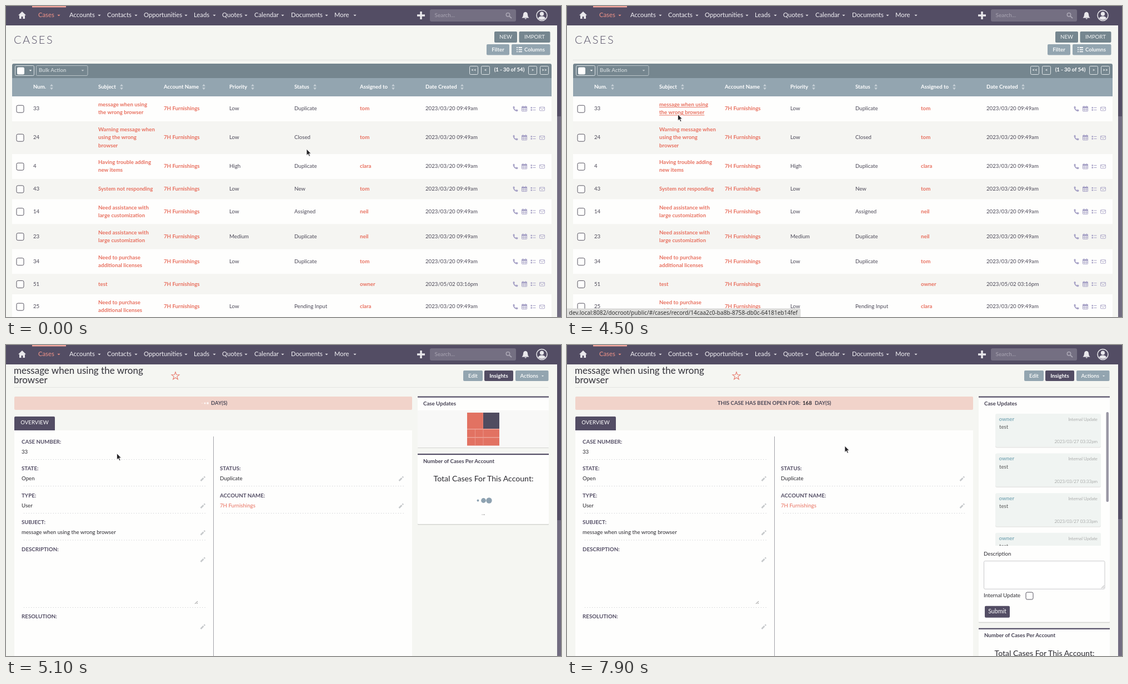
Recreate the animation shown at these times as an HTML page. Size 999x561 px, loop 8000 ms.

```html
<!DOCTYPE html>
<html lang="en">
<head>
<meta charset="utf-8">
<title>Case list</title>
<style>
html, body { margin: 0; width: 100%; height: 100%; overflow: hidden; background: #f5f6f2 }
svg { display: block; font-family: Lato, sans-serif; white-space: pre }
</style>
</head>
<body>
<svg id="stage" width="999" height="561" viewBox="0 0 999 561"></svg>
<script>
const DARK = '#534d64', SLATE = '#75868f', BLUE = '#93a5b0', LINK = '#e8705f', INK = '#4b4857',
  PAPER = '#fefefd', BLACK = '#2b2a30';
const COMPANY = '7H Furnishings', USER = 'owner';
const LOOP = 8000, STEP = 100;

// Drawing helpers; text is centred vertically on y
const rect = (x, y, w, h, fill, r = 0, more = '') =>
  `<rect x="${x}" y="${y}" width="${w}" height="${h}" rx="${r}" fill="${fill}" ${more}/>`;
const text = (x, y, s, fill = INK, size = 9.7, weight = 400, anchor = 'start', more = '') =>
  `<text x="${x}" y="${y + size * .36}" fill="${fill}" font-size="${size}" font-weight="${weight}" text-anchor="${anchor}" ${more}>${s}</text>`;
const bold = (x, y, s, fill = INK, size = 9.7, anchor, more) => text(x, y, s, fill, size, 700, anchor, more);
const path = (d, fill, more = '') => `<path d="${d}" fill="${fill}" ${more}/>`;
const line = (d, stroke, w = 1, more = '') => path(d, 'none', `stroke="${stroke}" stroke-width="${w}" ${more}`);
const dot = (x, y, r, fill, more = '') => `<circle cx="${x}" cy="${y}" r="${r}" fill="${fill}" ${more}/>`;
const ring = (x, y, r, stroke, w) => dot(x, y, r, 'none', `stroke="${stroke}" stroke-width="${w}"`);
const at = (x, y, body) => `<g transform="translate(${x} ${y})">${body}</g>`;
const fade = (o, body) => `<g opacity="${o}">${body}</g>`;
const times = (n, f) => Array.from({ length: n }, (_, i) => f(i)).join('');
const caret = (x, y, fill, w = 2.6) => path(`M${x - w} ${y - w / 2}h${2 * w}l${-w} ${w}z`, fill);
const frame = (x, y, w, h, stroke, r = 2, fill = 'none') => rect(x, y, w, h, fill, r, `stroke="${stroke}"`);
const checkbox = (x, y) => frame(x - 6.5, y - 6.5, 13, 13, '#55525f', 2.5, PAPER);
const dotted = (x, y) => line(`M${x} ${y}h328`, '#bfc1c4', 1, 'stroke-dasharray="1 3.4"');
const pencil = (x, y) => line(`M${x - 3.5} ${y + 3.5}l5 -5m1 -1l1.6 -1.6`, '#c6c9cb', 2.6);
const button = (x, y, w, h, s, fill, weight = 700, color = '#f3f5f5') =>
  rect(x, y, w, h, fill, 2) + text(x + w / 2, y + h / 2 - .3, s, color, 9.7, weight, 'middle');

function navbar() {
  const items = [['Cases', 58, 95], ['Accounts', 114, 168], ['Contacts', 182, 234], ['Opportunities', 248, 324],
    ['Leads', 338, 375], ['Quotes', 389, 432], ['Calendar', 447, 498], ['Documents', 513, 577], ['More', 591, 628]];
  const pale = '#e9e8ec', rose = '#f19488';
  return rect(0, 0, 992, 35, DARK) + rect(47, 0, 61, 2.5, '#f2a69d') +
    path('M22 16.8L29 10l7 6.8h-2V23h-3.6v-4h-2.8v4H24v-6.2z', pale) +
    items.map(([s, x, c], i) => text(x, 16.2, s, i ? '#f3f2f5' : rose, 11.25) + caret(c, 17, i ? pale : rose)).join('') +
    line('M740 17h14M747 10v14', pale, 3.4) +
    rect(763, 6, 155, 22, '#746f82', 3) + text(771.5, 16.5, 'Search...', '#a9a5b3', 10) +
    ring(903.5, 15.8, 3.2, '#aaa6b4', 1.5) + line('M906 18.3l4 3.7', '#aaa6b4', 1.8) +
    path('M928.5 21.5q2.5 -2 2.5 -6q0 -4 4 -4.8q4 .8 4 4.8q0 4 2.5 6zM933.5 22.3h3.5q-1.7 3 -3.5 0z', pale) +
    ring(964.5, 17, 9.5, pale, 1.5) + dot(964.5, 14.2, 3.6, pale) +
    path('M957.8 22.5q1.5 -4 6.7 -4t6.7 4q-6.7 5 -13.4 0z', pale);
}

const scrollbar = h => rect(992, 0, 7, 561, '#716c80') + rect(992, 0, 7, h, DARK);

// [number, subject lines, priority, status, assignee]
const CASES = [
  [33, 'message when using|the wrong browser', 'Low', 'Duplicate', 'tom'],
  [24, 'Warning message when|using the wrong|browser', 'Low', 'Closed', 'tom'],
  [4, 'Having trouble adding|new items', 'High', 'Duplicate', 'clara'],
  [43, 'System not responding', 'Low', 'New', 'tom'],
  [14, 'Need assistance with|large customization', 'Low', 'Assigned', 'neil'],
  [23, 'Need assistance with|large customization', 'Medium', 'Duplicate', 'neil'],
  [34, 'Need to purchase|additional licenses', 'Low', 'Duplicate', 'tom'],
  [51, 'test', '', '', USER],
  [25, 'Need to purchase|additional licenses', 'Low', 'Pending Input', 'clara']];
const COLUMNS = [['Num.', 49, 82], ['Subject', 166, 208], ['Account Name', 284, 356], ['Priority', 402, 444],
  ['Status', 519, 556], ['Assigned to', 637, 697], ['Date Created', 755, 821]];
const ROW_HEIGHT = [0, 36.5, 45, 59];

function rowIcons(y) {
  const c = '#a7a2c6';
  return at(917, y, path('M-4.5 -3.5l2 -1.2l1.5 2.7l-1.2 1.2q1 2 3 3l1.2 -1.2l2.8 1.5l-1.2 2.2q-2 .8 -5 -1.6t-3.1 -6.6z', c)) +
    at(933, y, rect(-4.5, -3.5, 9, 8, 'none', .5, `stroke="${c}"`) + rect(-5, -4, 10, 3, c) +
      line('M-2.5 -5.5v2M2.5 -5.5v2M-4 1.5h8M-1.7 -1v5M1.7 -1v5', c, .9)) +
    at(949, y, rect(-4.5, -3, 2.6, 2.4, c) + rect(-4.5, 1, 2.6, 2.4, c) + line('M-.5 -1.8h5M-.5 2.2h5', c, 1.2)) +
    at(965, y, rect(-4.5, -3, 9, 6.5, 'none', .8, `stroke="${c}" stroke-width=".9"`) + line('M-4.3 -2.3L0 1.2L4.3 -2.3', c, .9));
}

function listView(hover) {
  let top = 163;
  const rows = CASES.map(([num, subject, priority, status, who], i) => {
    const lines = subject.split('|'), h = ROW_HEIGHT[lines.length], y = top + h / 2, c = y - .6;
    const deco = hover && !i ? 'text-decoration="underline"' : '';
    const out = rect(11, top, 971, h, i % 2 ? '#f5f5f2' : PAPER) + checkbox(25.5, y + .2) +
      text(49, c, num) +
      lines.map((s, k) => bold(166, c + (k - (lines.length - 1) / 2) * 14.2, s, LINK, 9.7, 'start', deco)).join('') +
      bold(284, c, COMPANY, LINK) + text(402, c, priority) + text(519, c, status) + bold(637, c, who, LINK) +
      text(755, c, num == 51 ? '2023/05/02 03:16pm' : '2023/03/20 09:49am') + rowIcons(y - .2);
    top += h;
    return out;
  }).join('');
  const pale = '#dfe5e8', dim = '#c5cdd1';
  const pager = (x, s) => frame(x + .5, 108.5, 15, 15, pale) + bold(x + 8, 115.5, s, '#fff', 8, 'middle');
  return scrollbar(199) +
    text(14, 61, 'CASES', DARK, 20, 300, 'start', 'letter-spacing="2.5"') +
    button(879, 46, 41, 20, 'NEW', SLATE, 400) + button(923.5, 46, 56, 20, 'IMPORT', SLATE, 400) +
    button(865, 69, 41, 19.5, 'Filter', BLUE) + rect(910, 69, 69.5, 19.5, BLUE, 2) + bold(933, 78.3, 'Columns', '#f3f5f5', 9.5) +
    times(3, i => line(`M919 ${75 + i * 3.7}h2m1.5 0h6.5`, '#f3f5f5', 1.8)) +
    line('M11 97.5H980', '#cfd1d1', 1, 'stroke-dasharray="1 1"') +
    rect(11, 104, 971, 32, SLATE, 3) + rect(11, 130, 971, 33, BLUE) +
    frame(16.5, 107.5, 34, 18, pale) + rect(20, 110.5, 13, 13, '#fff', 2.5) + caret(44, 116.5, '#fff', 2.3) +
    frame(54.5, 107.5, 92.5, 18, '#b9c3c8') + bold(59, 115.7, 'Bulk Action', dim, 9.6) + caret(138, 116.5, dim, 2.3) +
    pager(834, '&lt;&lt;') + pager(855, '&lt;') + bold(906, 115, '(1 - 30 of 54)', '#fff', 9.6, 'middle') +
    pager(940, '&gt;') + pager(961, '&gt;&gt;') +
    COLUMNS.map(([s, x, a]) => bold(x, 145.5, s, '#fff', 9.6) +
      path(`M${a - 2.8} 144.8l2.8 -4l2.8 4zM${a - 2.8} 147.2l2.8 4l2.8 -4z`, '#c6d0d6')).join('') + rows;
}

const card = (y, h, title) => rect(741, y + 1.5, 236, h, '#00000022', 1) + rect(741, y, 236, h, PAPER, 1) +
  rect(741, y, 236, 2.2, DARK) + bold(751, y + 13.3, title, '#454153', 9.7);
const totalTitle = y => text(859.5, y, 'Total Cases For This Account:', BLACK, 14.1, 400, 'middle');

// Comment form, y is the centre of its first label
const form = y => text(750, y, 'Description', BLACK) + frame(750.5, y + 13, 217.5, 50.5, '#c9c9cc', 2, '#fff') +
  line(`M962 ${y + 62}l5 -5m-2 5l2 -2`, '#888', .8) + text(750, y + 74.5, 'Internal Update', BLACK) +
  checkbox(832.5, y + 75.8) + rect(752, y + 94, 45, 21, DARK, 2) + text(774.5, y + 103.7, 'Submit', '#fff', 10.6, 400, 'middle');

function skeleton(reveal) {
  const row = (x, y) => rect(x, y, 67, 14, '#b9b7be', 2.5) + rect(x, y + 19.5, 318, 14.5, '#e3e9e9', 2.5) +
    pencil(x + 326, y + 27) + dotted(x + 4, y + 40);
  return scrollbar(409) + text(15, 50, 'CASES', DARK, 16, 300, 'start', 'letter-spacing="2"') +
    line('M15 67.5H977', '#dcdddb') + rect(15, 82, 716, 25, '#f4e1da', 2) +
    rect(15, 118, 67, 26, '#b7b5bc', 2) + rect(83, 118, 66.5, 24, '#e9ebeb', 2) + rect(150.5, 118, 66.5, 24, '#e9ebeb', 2) +
    rect(15, 142, 716, 327, PAPER, 2) +
    times(6, i => {
      const y = 156 + i * 51.8;
      return row(28, y) + row(385, y) + line(`M373.5 ${y}v46`, '#a9a8ae');
    }) +
    rect(15, 503, 716, 60, PAPER) + rect(15, 503, 716, 2.2, DARK) + bold(29, 517, 'Select which subpanels to view', '#454153') +
    path('M705.5 514h11.5l-5.7 8.5z', DARK) +
    times(6, i => rect(28 + i * 114.7, 543, 108, 20, PAPER, 0, 'stroke="#ddd"') + rect(28 + i * 114.7, 542, 108, 2.4, DARK)) +
    line('M461 562v-9h8.5v9m0 -7h2v7M463 556h4.5m-4.5 2.5h4.5', DARK) +
    ring(580.5, 559, 5.5, DARK, 1.3) + line('M580.5 555.5v4l3 1', DARK) +
    path('M694 554v6h6a6 6 0 1 1 -6 -6zM695.5 553a6 6 0 0 1 5.5 5.5h-5.5z', DARK) +
    card(82, 164, 'Case Updates') + fade(reveal, form(117)) +
    card(257.5, 126, 'Number of Cases Per Account') +
    fade(reveal, totalTitle(298) + dot(849.5, 336.5, 4, BLUE) + dot(859.5, 336.5, 1.5, BLUE));
}

// Pulsing loader dots; phase counts steps
const pulse = (x, y, gap, size, fill, phase) => times(3, i =>
  dot(x + i * gap, y, (size * Math.abs(Math.sin(.38 + i * .62 + phase * .45))).toFixed(2), fill));

function loadingSide(step) {
  const quad = ((step >> 1) + 1) % 4, x = [830, 859, 859, 830][quad], y = [122, 122, 152, 152][quad];
  return card(92.5, 92, 'Case Updates') + rect(741, 118, 236, 67, '#f8f8f7') + rect(830, 122, 58, 59.5, '#e27262') +
    line('M830 151.8h58M830 166.8h58', '#f5c5bd', .9) + line('M844.5 152v29.5M859 122v59.5', '#ed9c90', .8) +
    rect(x, y, 29, 29, '#504c60') +
    card(196, 127, 'Number of Cases Per Account') + totalTitle(241) +
    pulse(849.5, 280.5, 10, 5.2, '#8ea2b1', step) + line('M856.5 306h1.5m1 0h3', '#999', 1);
}

function comments(expanded) {
  const x = expanded ? 771 : 773, w = expanded ? 190 : 196, h = expanded ? 60 : 34, gap = expanded ? 71.6 : 46;
  return times(expanded ? 4 : 5, i => {
    const y = 124 + i * gap, last = i == 4, right = x + w - 6;
    return rect(x, y + 1.5, w, h, '#00000018', 3) + rect(x, y, w, h, last ? '#e3efda' : '#f0f4f2', 3) +
      bold(x + 6.5, y + 9.3, USER, last ? '#66736f' : '#82adba') +
      (last ? '' : text(right, y + 10, 'Internal Update', '#777', 7.9, 300, 'end')) +
      (expanded ? text(x + 7, y + 23.7, 'test', '#555') : '') +
      text(right, y + h - 9.5, `2023/03/27 03:3${i ? 3 : 2}pm`, '#777', 8, 300, 'end');
  });
}

function loadedSide(t) {
  const expanded = t >= 7300, shift = expanded ? 12.7 : 0;
  const shown = Math.min(1, (t - 5700) / 400);
  return card(92.5, 394.5 + shift, 'Case Updates') +
    fade(shown, expanded
      ? `<clipPath id="pane"><rect x="741" y="118" width="236" height="244"/></clipPath><g clip-path="url(#pane)">${comments(true)}</g>` +
        rect(970.5, 121, 4.5, 162, '#9a97a5', 2)
      : comments(false)) +
    form(364 + shift) + card(498 + shift, 80, 'Number of Cases Per Account') +
    totalTitle(543 + shift) + bold(833, 574 + shift, '24', '#eda766', 46);
}

function detailView(t) {
  // [label, value, x, y, y of the dotted rule]
  const fields = [['CASE NUMBER', '33', 28, 174.5, 206.5], ['STATE', 'Open', 28, 222, 254.5], ['TYPE', 'User', 28, 271, 303.5],
    ['SUBJECT', 'message when using the wrong browser', 28, 319.5, 352], ['DESCRIPTION', '', 28, 368, 473.5],
    ['RESOLUTION', '', 28, 489, 600], ['STATUS', 'Duplicate', 385, 222, 254.5], ['ACCOUNT NAME', COMPANY, 385, 271, 303.5]];
  const star = times(10, i => {
    const a = (i / 5 - .5) * Math.PI, r = i % 2 ? 3 : 7.3;
    return `${305 + r * Math.cos(a)},${56 + r * Math.sin(a)} `;
  });
  const step = (t - 5100) / STEP;
  return scrollbar(t < 5800 ? 316 : 314) +
    text(14, 46.3, 'message when using the wrong', '#33323a', 17) + text(14, 63, 'browser', '#33323a', 17) +
    `<polygon points="${star}" fill="none" stroke="#e87b6e" stroke-width="1.1"/>` +
    button(823, 46, 35, 19, 'Edit', BLUE) + button(861, 46, 52, 19, 'Insights', DARK, 700, '#fff') +
    rect(917, 46, 59.5, 19, BLUE, 2) + bold(925.5, 55.2, 'Actions', '#f3f5f5', 9.6) + caret(966, 56, '#f3f5f5', 2) +
    line('M15 76.5H977', '#d3d5d3', 1, 'stroke-dasharray="1 1"') +
    rect(15, 93, 716, 24, '#f1d3ca', 2) +
    (t < 6300 ? pulse(353, 105, 5, 1.9, '#fdf6f4', step) + bold(369, 104.3, 'DAY(S)', INK, 9.5)
      : bold(271, 104.3, 'THIS CASE HAS BEEN OPEN FOR:', INK, 9.6) + bold(424, 104.3, '168', BLACK, 9.6) + bold(446, 104.3, 'DAY(S)', INK, 9.5)) +
    rect(15, 129, 73, 27, DARK, 2) + text(51.5, 140, 'OVERVIEW', '#fff', 9.7, 400, 'middle') +
    rect(15, 154, 716, 410, PAPER) + line('M373.5 165V561', '#a3a2a9') +
    fields.map(([label, value, x, y, end], i) => bold(x, y, label + ':', DARK, 9.75) +
      text(x, y + 18.4, value, value == COMPANY ? LINK : BLACK) +
      (i ? pencil(x + 326, y + 19.5) : '') + dotted(x + 4, end)).join('') +
    line('M340 467l5 -5m-2 5l2 -2', '#777', .9) +
    (t < 5800 ? loadingSide(step) : loadedSide(t));
}

const URL_TEXT = 'dev.local:8082/docroot/public/#/cases/record/14caa2c0-ba8b-8758-db0c-64181eb14fef';

function statusBar(t) {
  const grow = t < 2900 ? 0 : Math.min(1, (t - 2800) / 300), w = 332 + grow * 88;
  const s = grow < 1 ? URL_TEXT.slice(0, 62 + Math.round(grow * 17)) + '…' : URL_TEXT;
  return rect(-3, 546, w + 3, 18, '#dededc', 2, 'stroke="#cbcbc9" stroke-width=".6"') +
    text(3.5, 553.5, s, '#343434', 10.15, 400, 'start', 'font-family="Noto Sans, sans-serif"');
}

// Pointer positions, one per step from the given time
const MOVES = [[0, [[541, 258]]],
  [700, [[533, 266], [498, 272], [430, 263], [342, 241], [262, 217], [212, 200], [199.5, 195.5]]],
  [7600, [[235, 217], [345, 211], [455, 192], [500, 182]]]];

function pointer(t) {
  const [start, points] = MOVES.findLast(m => t >= m[0]);
  const [x, y] = points[Math.min(points.length - 1, (t - start) / STEP)];
  const edge = 'stroke="#fff" stroke-width=".8" stroke-linejoin="round"';
  return at(x, y, t >= 1300 && t < 4500
    ? path('M0 0q1 -1.5 2 0v4l4.5 1q1.5 .5 1.3 2l-.8 4.5h-6L-3 6.5q0 -1.5 1.5 -1l1.5 1z', '#242326', edge)
    : path('M0 0V11.5L2.7 9L4.6 13.2L6.5 12.3L4.6 8.3H8z', '#242326', edge));
}

function scene(t) {
  const page = t < 4700 ? listView(t >= 1200) : t < 5000 ? skeleton(t < 4900 ? .13 : .6) : detailView(t);
  return page + navbar() + (t >= 1500 && t < 4900 ? statusBar(t) : '') + pointer(t);
}

const stage = document.getElementById('stage');
let drawn = -1;
function tick(now) {
  const t = Math.floor(now % LOOP / STEP) * STEP;
  if (t !== drawn) stage.innerHTML = scene(drawn = t);
  requestAnimationFrame(tick);
}
tick(performance.now());
</script>
</body>
</html>
```
